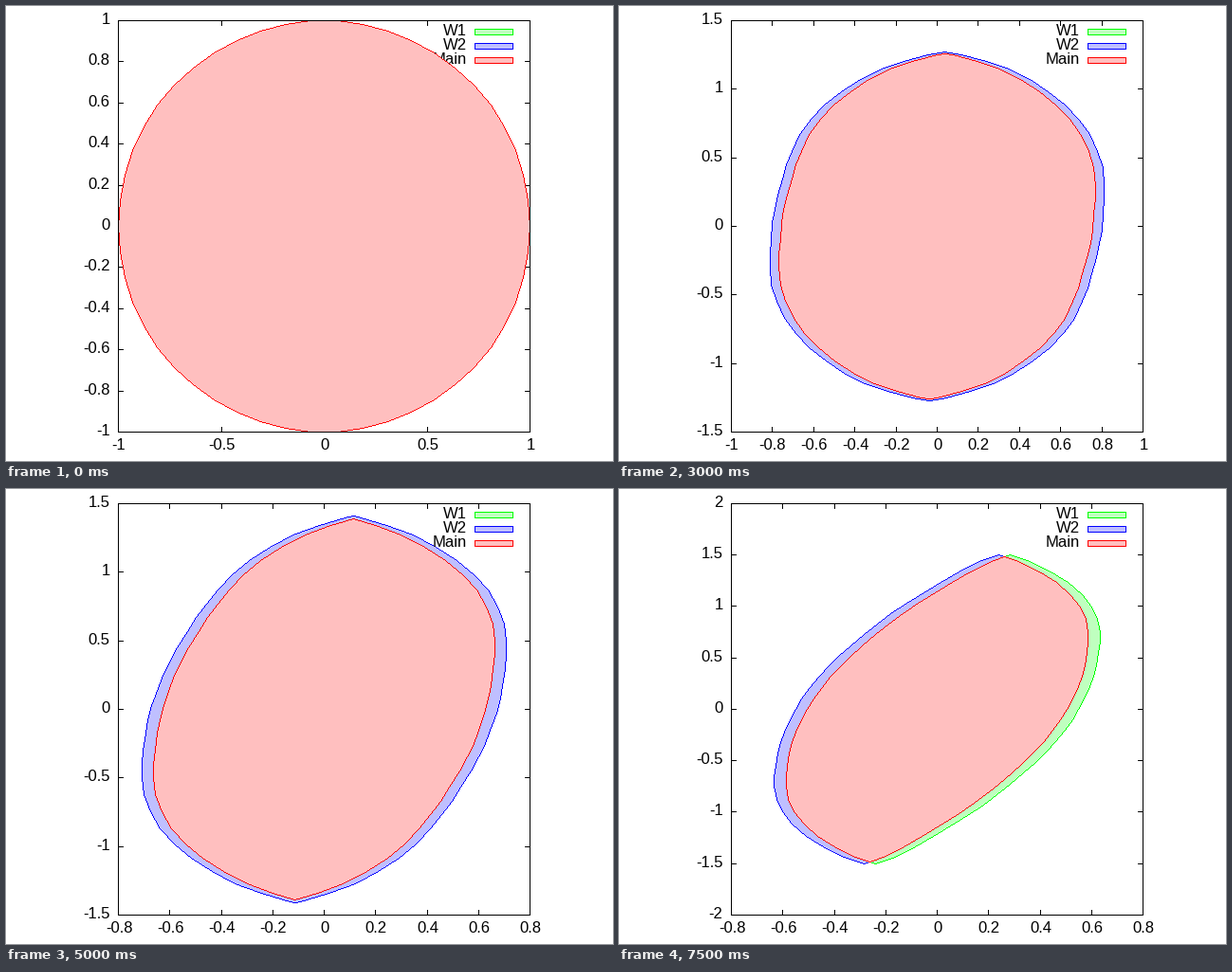
These frames come from a looping animation (640x480 px, 8 s). A matplotlib script:

```python
import math
import numpy as np
import matplotlib.pyplot as plt
from matplotlib.animation import FuncAnimation

W, H, DPI = 640, 480, 100
LEFT, RIGHT, TOP, BOTTOM = 118, 552, 15, 449
STEPS, DT, SHIFT = 16, 0.05, np.array([0.045, 0.0])
BLACK = (0, 0, 0)
SETS = [("W1", (0, 255, 0), (191, 255, 191)),
        ("W2", (0, 0, 255), (191, 191, 255)),
        ("Main", (255, 0, 0), (255, 191, 191))]


def cross(a, b):
    return a[0] * b[1] - a[1] * b[0]


def hull(points):
    """Convex hull, counter-clockwise."""
    pts = sorted({(round(float(x), 7), round(float(y), 7)) for x, y in points})

    def chain(seq):
        out = []
        for p in seq:
            while len(out) > 1 and cross(
                    (out[-1][0] - out[-2][0], out[-1][1] - out[-2][1]),
                    (p[0] - out[-2][0], p[1] - out[-2][1])) <= 1e-9:
                out.pop()
            out.append(p)
        return out[:-1]

    return np.array(chain(pts) + chain(pts[::-1]))


def intersect(poly, cutter):
    """Intersection of two convex polygons."""
    for a, b in zip(cutter, np.roll(cutter, -1, axis=0)):
        side = (b[0] - a[0]) * (poly[:, 1] - a[1]) - (b[1] - a[1]) * (poly[:, 0] - a[0])
        out = []
        for i in range(len(poly)):
            j = (i + 1) % len(poly)
            if side[i] >= 0:
                out.append(poly[i])
            if side[i] * side[j] < 0:
                u = side[i] / (side[i] - side[j])
                out.append(poly[i] + u * (poly[j] - poly[i]))
        poly = np.array(out)
    return hull(poly)


def evolve():
    """Grow by a tilting segment, then erode sideways, once per step."""
    ang = 2 * np.pi * np.arange(50) / 50
    main = np.column_stack([np.cos(ang), np.sin(ang)])
    states = [(main, main, main)]
    for k in range(1, STEPS):
        push = DT * np.array([DT * (k - 1), 1.0])
        grown = hull(np.vstack([main + push, main - push]))
        main = intersect(grown + SHIFT, grown - SHIFT)
        if k % 2:
            w1 = intersect(grown, grown + SHIFT)
            w2 = intersect(grown, grown - SHIFT)
        else:
            w1 = w2 = grown
        states.append((w1, w2, main))
    return states


def autoscale(half):
    step = 0.2 if 2 * half < 2 - 1e-6 else 0.5
    count = math.ceil(half / step - 1e-6)
    return count * step, step, count


def nearest(v):
    return np.floor(np.asarray(v) + 0.5).astype(int)


def new_layer():
    return np.zeros((H, W, 4), np.uint8)


def stroke(layer, points, color):
    """Hard-edged polyline, one pixel wide; returns its pixels."""
    pixels = []
    for a, b in zip(points[:-1], points[1:]):
        a, b = np.asarray(a), np.asarray(b)
        t = np.linspace(0, 1, np.abs(b - a).max() + 1)[:, None]
        pixels.append(nearest(a + t * (b - a)))
    xs, ys = np.vstack(pixels).T
    layer[ys, xs] = (*color, 255)
    return xs, ys


def shape(layer, points, edge, face):
    """Filled convex polygon with an outline."""
    ring = np.vstack([points, points[:1]])
    xs, ys = stroke(layer, ring, edge)
    for y in range(ys.min(), ys.max() + 1):
        row = xs[ys == y]
        layer[y, row.min():row.max() + 1] = (*face, 255)
    layer[ys, xs] = (*edge, 255)


STATES = evolve()
fig = plt.figure(figsize=(W / DPI, H / DPI), dpi=DPI, facecolor="white")
ax = fig.add_axes([0, 0, 1, 1])


def show(layer, z):
    ax.imshow(layer, extent=(0, W, H, 0), aspect="auto",
              interpolation="nearest", zorder=z)


def label(x, y, text, ha, z=1):
    ax.text(x, y, text, ha=ha, va="baseline", fontsize=12,
            family="Liberation Sans", color="black", zorder=z)


def draw_ticks(xscale, yscale):
    layer = new_layer()
    _, step, n = xscale
    for i in range(-n, n + 1):
        x = int(nearest(LEFT + (RIGHT - LEFT) * (i + n) / (2 * n)))
        stroke(layer, [(x, BOTTOM), (x, BOTTOM - 5)], BLACK)
        stroke(layer, [(x, TOP), (x, TOP + 5)], BLACK)
        label(x + 1, 468, f"{i * step:g}", "center")
    _, step, n = yscale
    for i in range(-n, n + 1):
        y = BOTTOM - int(nearest((BOTTOM - TOP) * (i + n) / (2 * n)))
        stroke(layer, [(LEFT, y), (LEFT + 5, y)], BLACK)
        stroke(layer, [(RIGHT, y), (RIGHT - 5, y)], BLACK)
        label(109.5, y + 4, f"{i * step:g}", "right")
    show(layer, 0)


def draw(k):
    ax.clear()
    ax.axis("off")
    polys = STATES[k]
    half = np.abs(np.vstack(polys)).max(axis=0)
    xscale, yscale = autoscale(half[0]), autoscale(half[1])
    draw_ticks(xscale, yscale)

    cx, cy = (LEFT + RIGHT) / 2, (TOP + BOTTOM) / 2
    sx = (RIGHT - LEFT) / 2 / xscale[0]
    sy = (BOTTOM - TOP) / 2 / yscale[0]
    for i, (poly, (name, edge, face)) in enumerate(zip(polys, SETS)):
        y, z = 27 + 15 * i, 2 + 2 * i
        label(486, y + 4, name, "right", z)
        layer = new_layer()
        shape(layer, nearest(np.column_stack([cx + sx * poly[:, 0],
                                              cy - sy * poly[:, 1]])), edge, face)
        shape(layer, [(494, y - 3), (534, y - 3), (534, y + 3), (494, y + 3)], edge, face)
        show(layer, z + 1)

    frame = new_layer()
    stroke(frame, [(LEFT, TOP), (RIGHT, TOP), (RIGHT, BOTTOM), (LEFT, BOTTOM),
                   (LEFT, TOP)], BLACK)
    show(frame, 10)
    ax.set_xlim(0, W)
    ax.set_ylim(H, 0)
    return []


anim = FuncAnimation(fig, draw, frames=STEPS, init_func=lambda: [], interval=500,
                     repeat=True, repeat_delay=0, blit=False)
plt.show()
```
